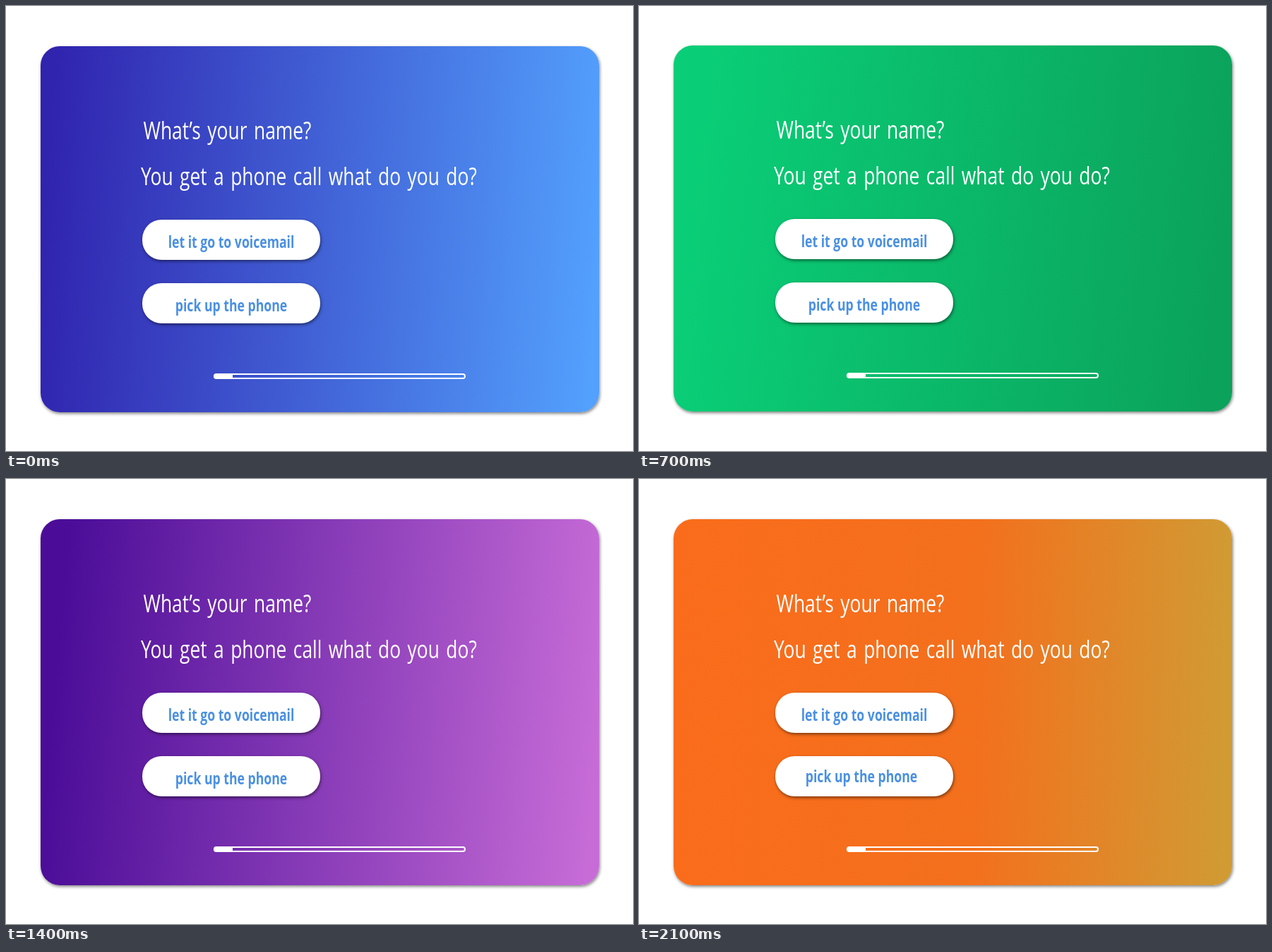
Write an HTML page that moves like this. It is 888x631 px and loops after 2.8 s.

```html
<!DOCTYPE html>
<html lang="en">
<head>
<meta charset="utf-8">
<title>Quiz card colours</title>
<style>
  html, body { margin: 0; width: 100%; height: 100%; overflow: hidden; background: #fff; }
  .stage { position: absolute; left: 0; top: 0; width: 888px; height: 631px; animation: nudge 2.8s step-end infinite; }

  .card { position: absolute; left: 49px; top: 56.5px; width: 791px; height: 519.5px; border-radius: 27px;
    box-shadow: 1px 2px 4px rgba(0, 0, 0, .5); }
  .theme { position: absolute; inset: 0; border-radius: inherit; opacity: 0;
    animation: show 2.8s calc((var(--i) - 4) * .7s) step-end infinite; }
  .blue   { --i: 0; background: linear-gradient(94deg, #3023ae 2%, #53a0fd 98%); }
  .green  { --i: 1; background: linear-gradient(96deg, #0ace77 5%, #0ba25b 97%); }
  .purple { --i: 2; background: linear-gradient(95deg, #4b0d98 5%, #c76cd7 98%); }
  .orange { --i: 3; background: linear-gradient(91deg, #fa6c1b, #f3701d 54%, #d19a33 98%); }

  svg { position: absolute; left: 0; top: 0; }
  text { font-family: "Open Sans", "Noto Sans", sans-serif; }
  .ask { font-size: 35.5px; word-spacing: 3.5px; fill: #fff; }
  .pick { font-size: 24px; font-weight: 700; fill: #4a90e2; text-anchor: middle; }
  .button { fill: #fff; filter: drop-shadow(1px 2px 2px rgba(0, 0, 0, .5)); }
  .jog { animation: jog 2.8s step-end infinite; }

  @keyframes show { 0% { opacity: 1; } 25%, 100% { opacity: 0; } }
  @keyframes nudge {
    0%, 50%, 100% { transform: none; }
    25% { transform: translateY(-1px); }
  }
  @keyframes jog {
    0% { transform: none; }
    75%, 100% { transform: translate(-4px, -3px); }
  }
</style>
</head>
<body>
<div class="stage">
  <div class="card">
    <div class="theme blue"></div>
    <div class="theme green"></div>
    <div class="theme purple"></div>
    <div class="theme orange"></div>
  </div>
  <svg width="888" height="631" viewBox="0 0 888 631">
    <!-- one narrow setting per type style -->
    <text class="ask" transform="translate(194.5 189) scale(.743 1)">What’s your name?</text>
    <text class="ask" transform="translate(191 254) scale(.743 1)">You get a phone call what do you do?</text>

    <rect class="button" x="193" y="303" width="252" height="57" rx="27.5"/>
    <rect class="button" x="193" y="393" width="252" height="57" rx="27.5"/>
    <text class="pick" transform="translate(319 343) scale(.735 1)">let it go to voicemail</text>
    <g class="jog">
      <text class="pick" transform="translate(319 433) scale(.735 1)">pick up the phone</text>
    </g>

    <rect x="295" y="522" width="355" height="6" rx="3" fill="none" stroke="#fff" stroke-width="2"/>
    <path d="M321 521.5h-23.5a3.5 3.5 0 0 0 0 7H321z" fill="#fff"/>
  </svg>
</div>
</body>
</html>
```
